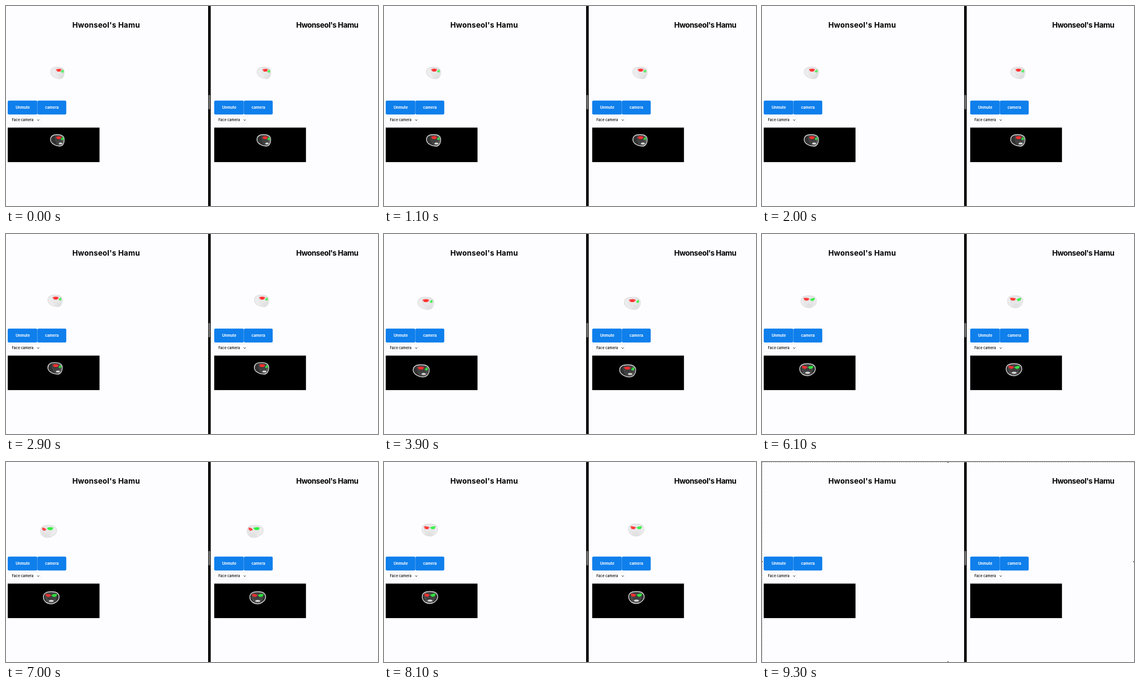
An HTML page with a canvas that plays this animation: 600x323 px, repeating every 9.7 s.

```html
<!DOCTYPE html>
<html lang="en">
<head>
<meta charset="utf-8">
<title>Video room</title>
<style>
  html, body { margin: 0; width: 100%; height: 100%; overflow: hidden; background: #fdfcfe; }
  svg, canvas { position: absolute; left: 0; top: 0; width: 600px; height: 323px; }
  text { font-family: Inter, sans-serif; }
  .title { font-size: 12px; font-weight: 700; text-anchor: middle; }
  .button { font-size: 6px; font-weight: 700; fill: #fff; text-anchor: middle; }
  .option { font-size: 5.7px; font-weight: 500; }
</style>
</head>
<body>
<svg viewBox="0 0 600 323">
  <defs>
    <g id="controls">
      <rect x="2.8" y="152.8" width="47.8" height="22.4" rx="2" fill="#0f7fec"/>
      <rect x="50.6" y="152.8" width="46.6" height="22.4" rx="2" fill="#0f7fec"/>
      <text class="button" x="27" y="166.4">Unmute</text>
      <text class="button" x="74" y="166.4">camera</text>
      <rect x="3.5" y="178.5" width="52" height="11" rx="1" fill="#fff" stroke="#f3f2f5" stroke-width=".7"/>
      <text class="option" x="9.4" y="186.3">Face camera</text>
      <path d="M50.4 183.4 52 185 53.6 183.4" fill="none" stroke="#222" stroke-width=".9"/>
      <rect x="2.8" y="196.4" width="148" height="55.7"/>
    </g>
  </defs>
  <text class="title" x="161.5" y="35.4" letter-spacing=".2">Hwonseol's Hamu</text>
  <text class="title" x="518" y="35.4" letter-spacing="-.4">Hwonseol's Hamu</text>
  <use href="#controls"/>
  <use href="#controls" x="333"/>
  <rect x="326" width="4.2" height="323"/>
  <rect x="326.7" y="143.5" width="2.5" height="23.5" rx="1.2" fill="#808080"/>
  <g id="selection" fill="none" stroke="#aaa" visibility="hidden">
    <path d="M0 .5H600M.5 0V323" stroke-width=".7" stroke-dasharray="2 1.5"/>
    <path d="M299 .5h2M299 322.5h2M.5 160v2M599.5 160v2" stroke="#444"/>
  </g>
</svg>
<canvas id="stage" width="600" height="323"></canvas>
<script>
const LOOP = 9700, STEP = 100, FACE_END = 9300, SELECT_START = 9000;
const PANE = 333, VIDEO_DROP = 109, VIDEO_LEAD = 150;
const ctx = document.getElementById('stage').getContext('2d');
const selection = document.getElementById('selection');

// Head turns: time, centre x, yaw in degrees
const turns = [
  [0, 83, 46], [1000, 80, 37], [3700, 79, 37], [4050, 60, 28], [4600, 98, 44],
  [5050, 75, 37], [5300, 82, 36], [6950, 68, -20], [7150, 73, 0], [9500, 75.5, 0]
];

const clamp = (v, min, max) => Math.min(max, Math.max(min, v));

function poseAt(t) {
  const i = turns.findIndex(turn => turn[0] > t);
  const [t0, x0, yaw0] = turns[i - 1], [t1, x1, yaw1] = turns[i];
  const u = (t - t0) / (t1 - t0), k = u * u * (3 - 2 * u);
  const x = x0 + (x1 - x0) * k;
  return {
    x,
    y: 108 + clamp((79 - x) * .38, 0, 4),
    w: clamp(11 + (83 - x) * .17, 11, 13),
    yaw: (yaw0 + (yaw1 - yaw0) * k) * Math.PI / 180
  };
}

function fillEllipse(x, y, rx, ry) {
  ctx.beginPath();
  ctx.ellipse(x, y, rx, ry, 0, 0, 7);
  ctx.fill();
}

// Eye and brow narrow, drop and tilt as they turn away
function drawEye(angle, w, color) {
  const side = Math.sin(angle), front = Math.cos(angle);
  const half = Math.max(2.3, w * .4 * front);
  ctx.save();
  ctx.translate(w * .8 * side, -4.3 + 2.5 * side * side);
  ctx.rotate(-.8 * side * Math.abs(side));
  ctx.strokeStyle = ctx.fillStyle = color;
  ctx.lineWidth = 1.6;
  ctx.beginPath();
  ctx.moveTo(-half, -.8);
  ctx.quadraticCurveTo(0, -2.4, half, -.8);
  ctx.stroke();
  fillEllipse(0, .6, half * .8, Math.max(.7, 1.6 * front));
  ctx.restore();
}

function drawFace({ x, y, w, yaw }) {
  const h = 6 + w * .3, chin = Math.sin(yaw) * w * .5;
  ctx.save();
  ctx.translate(x, y);

  const oval = new Path2D();
  oval.moveTo(-w, -1);
  oval.bezierCurveTo(-w, -.75 * h, -.6 * w, -h, 0, -h);
  oval.bezierCurveTo(.6 * w, -h, w, -.75 * h, w, -1);
  oval.bezierCurveTo(w, 4, chin + .5 * w, h, chin, h);
  oval.bezierCurveTo(chin - .55 * w, h, -w, 5, -w, -1);
  ctx.fillStyle = 'rgba(192,192,192,.18)';
  ctx.fill(oval);

  // Mesh of meridians and parallels
  ctx.save();
  ctx.clip(oval);
  ctx.strokeStyle = 'rgba(192,192,192,.5)';
  ctx.lineWidth = .5;
  ctx.beginPath();
  for (let a = -1.2; a <= 1.2; a += .3) {
    const px = w * .8 * Math.sin(yaw + a);
    ctx.moveTo(px * .7, -h);
    ctx.quadraticCurveTo(px * 1.4, 0, chin + px * .3, h);
  }
  for (let py = -8; py < h; py += 2.6) {
    ctx.moveTo(-w, py - 1);
    ctx.quadraticCurveTo(chin, py + 1.5, w, py - 1);
  }
  ctx.stroke();
  ctx.restore();

  ctx.strokeStyle = ctx.fillStyle = '#e0e0e0';
  ctx.lineWidth = 1.2;
  ctx.stroke(oval);
  fillEllipse(chin * 1.3, 5, 4 * Math.cos(yaw), 1.6);
  drawEye(yaw - .54, w, '#ff3030');
  drawEye(yaw + .54, w, '#30f040');
  ctx.restore();
}

function render() {
  const t = Math.floor(performance.now() % LOOP / STEP) * STEP;
  ctx.clearRect(0, 0, 600, 323);
  selection.setAttribute('visibility', t >= SELECT_START ? 'visible' : 'hidden');
  if (t < FACE_END) {
    const mesh = poseAt(t), video = poseAt(t + VIDEO_LEAD);
    video.y += VIDEO_DROP;
    for (const pose of [mesh, video]) {
      drawFace(pose);
      drawFace({ ...pose, x: pose.x + PANE });
    }
  }
  requestAnimationFrame(render);
}
render();
</script>
</body>
</html>
```
